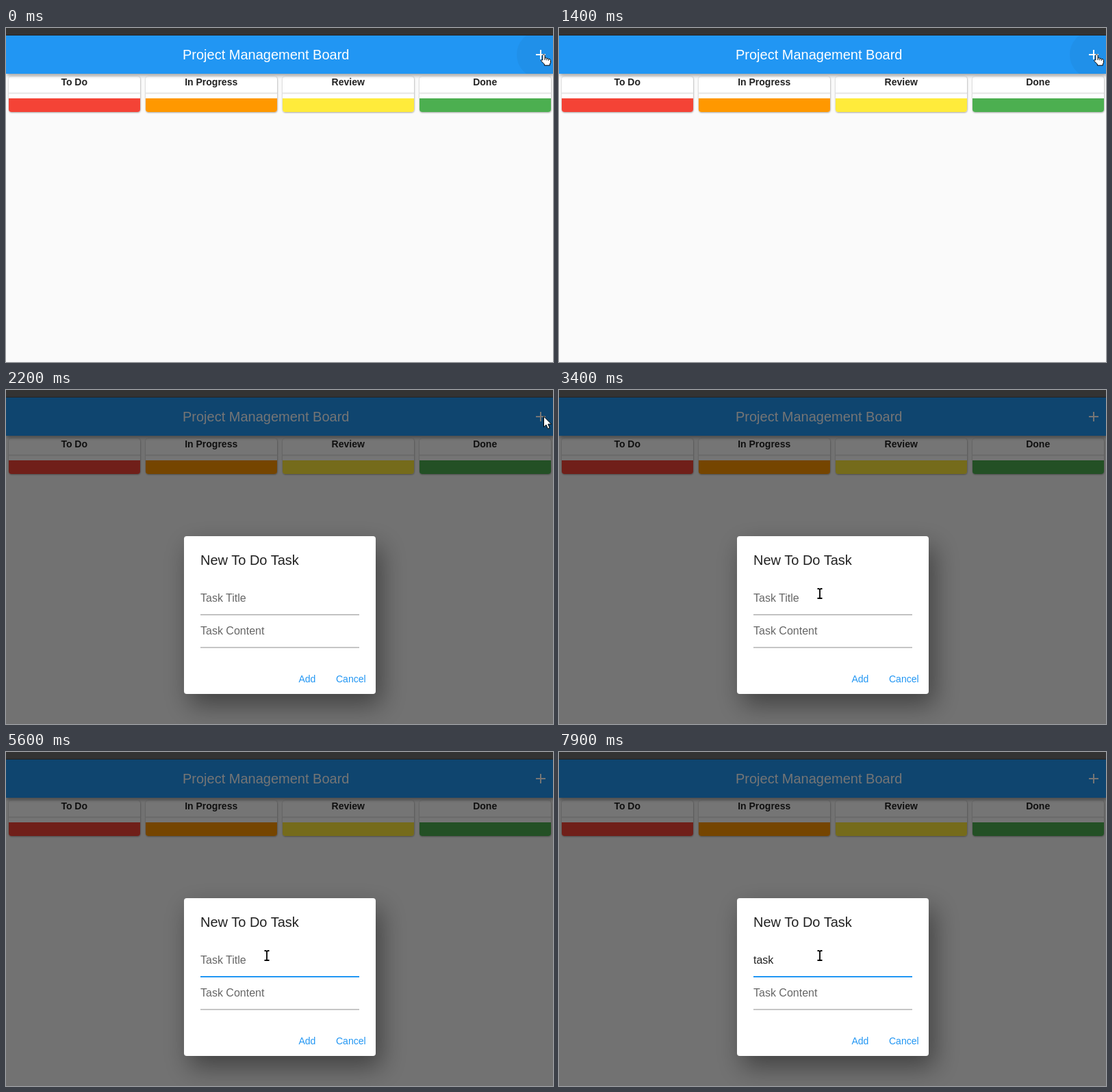
These frames come from a looping animation (799x489 px, 8 s). An HTML page:

```html
<!DOCTYPE html>
<html lang="en">
<head>
<meta charset="utf-8">
<title>Project board</title>
<style>
  html, body { margin: 0; width: 100%; height: 100%; overflow: hidden; background: #fafafa; }
  svg { display: block; width: 799px; height: 489px; font-family: "Liberation Sans", Arial, sans-serif; }
  text { white-space: pre; }
</style>
</head>
<body>
<svg viewBox="0 0 799 489">
  <defs>
    <filter id="blurS" x="-20%" y="-20%" width="140%" height="140%"><feGaussianBlur stdDeviation=".8"/></filter>
    <filter id="blurM" x="-5%" y="-40%" width="110%" height="180%"><feGaussianBlur stdDeviation="2.7"/></filter>
    <filter id="blurL" x="-30%" y="-30%" width="160%" height="160%"><feGaussianBlur stdDeviation="18"/></filter>
    <clipPath id="barClip"><rect y="11" width="799" height="56"/></clipPath>
  </defs>

  <rect width="799" height="489" fill="#fafafa"/>
  <g id="columns"></g>

  <rect x="1" y="14" width="799" height="56" opacity=".34" filter="url(#blurM)"/>
  <rect y="11" width="799" height="56" fill="#2196f3"/>
  <g clip-path="url(#barClip)">
    <circle id="hover" cx="781" cy="39" r="35" fill="#2090e9"/>
    <circle id="splash" cx="781" cy="39" r="35" fill="#bcbcbc"/>
  </g>
  <text x="258" y="46" font-size="20" fill="#fff">Project Management Board</text>
  <path d="M774 39h14M781 32v14" stroke="#fff" stroke-width="2"/>

  <g id="dialog">
    <rect y="11" width="799" height="478" opacity=".54"/>
    <rect x="268" y="230" width="280" height="231" rx="4" opacity=".42" filter="url(#blurL)"/>
    <rect x="260" y="214" width="280" height="231" rx="4" fill="#fff"/>
    <text x="284" y="256" font-size="20" fill="#212121">New To Do Task</text>
    <g font-size="16">
      <text id="hint" x="284" y="310" fill="#666">Task Title</text>
      <text id="typed" x="284" y="310" fill="#212121"></text>
      <text x="284" y="358" fill="#666">Task Content</text>
    </g>
    <rect x="284" y="328" width="232" height="2" fill="#c2c2c2"/>
    <rect id="focus" x="284" y="328" width="232" height="2" fill="#2196f3"/>
    <rect x="284" y="376" width="232" height="2" fill="#c6c6c6"/>
    <rect id="caret" width="2" fill="#4285f4"/>
    <g font-size="14" fill="#2196f3">
      <text x="427.5" y="428">Add</text>
      <text x="482" y="428">Cancel</text>
    </g>
  </g>

  <path d="M0 0H799V11H0z" fill="#333"/>
  <path d="M0 10.5H799" stroke="#232323"/>

  <g id="pointer">
    <g id="hand" stroke="#000" stroke-linejoin="round">
      <path fill="#fff" d="M.5.7c1 0 1.6.7 1.6 1.6V6c1.7-.5 2.8 0 3 .7 1.3-.4 2.3 0 2.6.8 1.7-.3 2.8.5 2.8 2v3.3l-1.2 2.2v1.8H1.4V15L-3 10.6c-.9-1.4.6-2.6 1.8-1.5V2.3C-1.200 1.400-.5.7.5.7z"/>
      <path fill="none" d="M2.100 6v3M5 7v2.300M7.700 7.800v2"/>
    </g>
    <path id="arrow" d="M.5.8V16.200L4 12.900 6.500 18.700 9.200 17.600 6.800 12H11.600z" fill="#fff" stroke="#000"/>
    <g id="beam" fill="none">
      <path d="M-3.500-7H-1.500L0-6 1.500-7H3.500M0-6V6M-3.500 7H-1.500L0 6 1.500 7H3.500" stroke="#fff" stroke-width="3.600"/>
      <path d="M-3.500-7H-1.500L0-6 1.500-7H3.500M0-6V6M-3.500 7H-1.500L0 6 1.500 7H3.500" stroke="#000" stroke-width="1.800"/>
    </g>
  </g>
</svg>
<script>
const LOOP = 8000, STEP = 100;
const OPEN = 2200, FOCUS = 4100;
const $ = id => document.getElementById(id);
const show = (id, on) => $(id).setAttribute('visibility', on ? 'inherit' : 'hidden');
const set = (id, attrs) => {
  for (const k in attrs) $(id).setAttribute(k, attrs[k]);
};

const columns = [
  ['To Do', '#f44336'], ['In Progress', '#ff9800'],
  ['Review', '#ffeb3b'], ['Done', '#4caf50']
];
$('columns').innerHTML = columns.map(([name, color], i) => `
  <g transform="translate(${4 + i * 200} 0)">
    <rect x=".3" y="71.7" width="192" height="52" rx="4" opacity=".4" filter="url(#blurS)"/>
    <rect y="71" width="192" height="52" rx="4" fill="#fff"/>
    <rect y="94.500" width="192" height="2" fill="#e6e6e6"/>
    <path d="M0 103H192V119a4 4 0 0 1-4 4H4a4 4 0 0 1-4-4z" fill="${color}"/>
    <text x="95.700" y="84" font-size="14" font-weight="bold" text-anchor="middle" fill="#212121">${name}</text>
  </g>`).join('');

// time, x, y of the pointer hot spot
const path = [
  [0, 785, 38], [400, 785, 38], [700, 758, 147], [800, 772, 82], [900, 783, 50],
  [1300, 786, 39], [1400, 785, 38], [2700, 785, 38], [2900, 390, 290],
  [3100, 390, 290], [3400, 381, 298], [LOOP, 381, 298]
];
const keyTimes = [5800, 6300, 6700, 7500];
const caretFlips = [[FOCUS, 1], [4500, 0], [5100, 1], [5600, 0], [5800, 1], [7200, 0], [7500, 1], [7900, 0]];
const advance = [0, 4.4, 13.3, 21.3, 29.3];

const ramp = (t, a, b) => Math.min(1, Math.max(0, (t - a) / (b - a)));

function pointerAt(t) {
  const i = path.findIndex(p => p[0] > t);
  const a = path[i - 1], b = path[i], k = ramp(t, a[0], b[0]);
  return [1, 2].map(n => Math.round(a[n] + (b[n] - a[n]) * k));
}

function pointerShape(x, y, open) {
  if (open) return x > 284 && x < 516 && y > 282 && y < 330 ? 'beam' : 'arrow';
  return x > 746 && y < 67 ? 'hand' : 'arrow';
}

function render(time) {
  const t = Math.floor(time / STEP) * STEP;
  const open = t >= OPEN;
  show('dialog', open);
  show('hover', !open);
  const splash = open ? 0 : ramp(t, 1800, 2000);
  set('splash', { r: 15 + 20 * splash, opacity: splash * 0.27 });

  const count = keyTimes.filter(k => t >= k).length;
  $('typed').textContent = 'task'.slice(0, count);
  set('hint', { opacity: 1 - ramp(t, 5700, 6000) });
  set('focus', { opacity: ramp(t, FOCUS - STEP, FOCUS + STEP) });

  const flip = caretFlips.filter(f => t >= f[0]).pop();
  show('caret', open && flip && flip[1]);
  set('caret', {
    x: 284 + Math.floor(advance[count]),
    y: count ? 296 : 298,
    height: count ? 18 : 14
  });

  const [x, y] = pointerAt(t), shape = pointerShape(x, y, open);
  set('pointer', { transform: `translate(${x} ${y})` });
  for (const id of ['hand', 'arrow', 'beam']) show(id, id === shape);
}

const start = performance.now();
function tick() {
  render((performance.now() - start) % LOOP);
  requestAnimationFrame(tick);
}
render(0);
tick();
</script>
</body>
</html>
```
